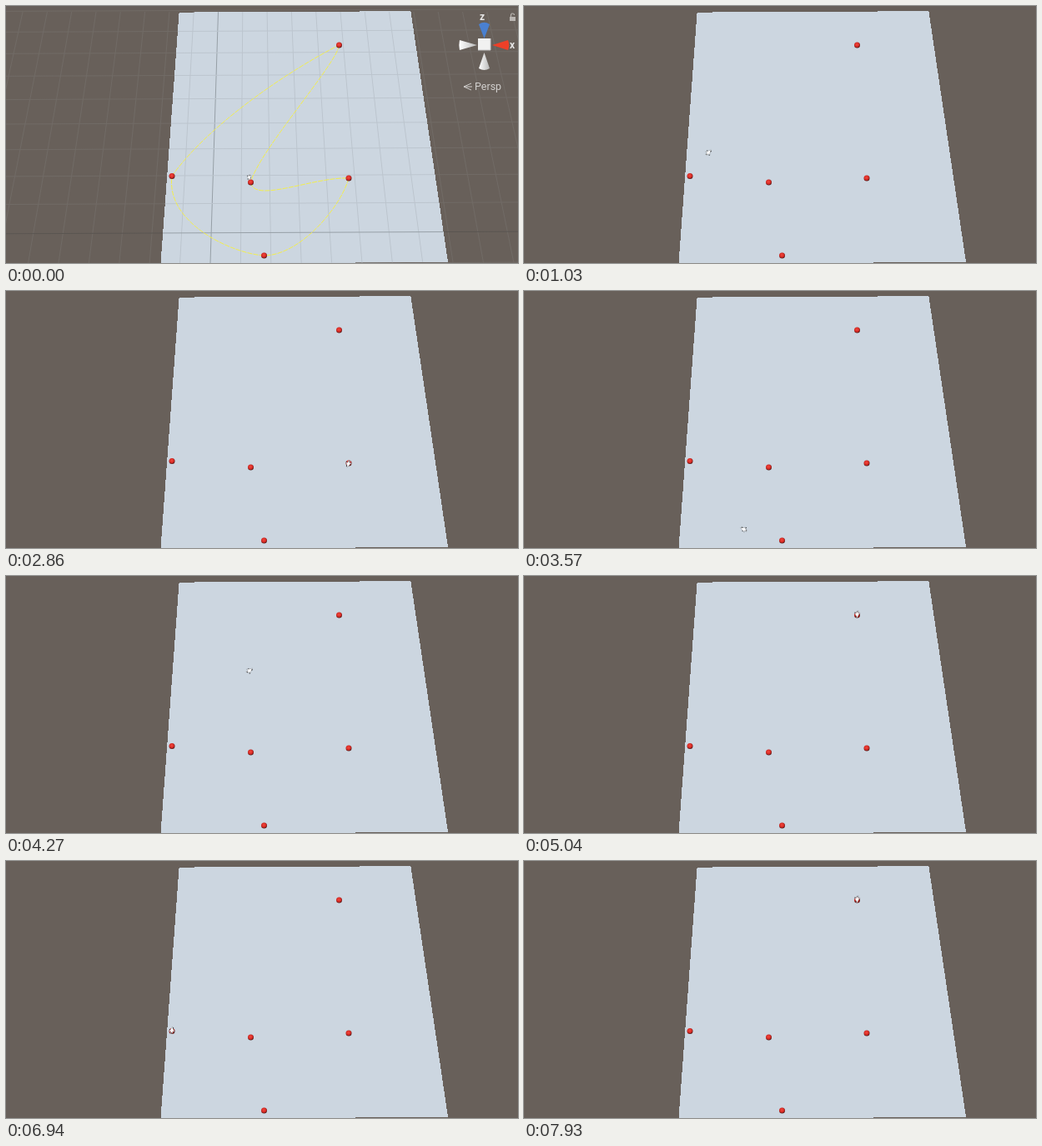
An HTML page for the animation above (8000 ms loop, 614 by 309 pixels).

```html
<!DOCTYPE html>
<html lang="en">
<head>
<meta charset="utf-8">
<title>Spline follower</title>
<style>
  html, body { margin: 0; width: 100%; height: 100%; overflow: hidden; background: #68605a; }
  svg { display: block; width: 614px; height: 309px; }
  text { font-family: Roboto, "Open Sans", sans-serif; }
</style>
</head>
<body>
<svg viewBox="0 0 614 309">
  <defs>
    <path id="floor" d="M207.6 7.6 485.4 6.2 530 307.6 185.4 310.4Z"/>
    <clipPath id="floorClip"><use href="#floor"/></clipPath>
    <radialGradient id="red" cx=".45" cy=".4" r=".62">
      <stop offset="0" stop-color="#f2483c"/>
      <stop offset=".6" stop-color="#d62a25"/>
      <stop offset="1" stop-color="#451311"/>
    </radialGradient>
    <linearGradient id="pale"><stop offset="0" stop-color="#fff"/><stop offset="1" stop-color="#b9b9b9"/></linearGradient>
  </defs>
  <rect width="614" height="309" fill="#68605a"/>
  <g class="editor" id="outerGrid" fill="none" stroke="#716b66"/>
  <use href="#floor" fill="#ccd6e0" shape-rendering="crispEdges"/>
  <g class="editor" id="floorGrid" fill="none" stroke="#bcc5ce" clip-path="url(#floorClip)"/>
  <path class="editor" id="route" fill="none" stroke="#f3ee4e" stroke-dasharray="6 1.2"/>
  <g id="balls"/>
  <g id="craft">
    <path d="M4.5 0 1 -1.6 -2 -3.4 -1.4 -1 -4.2 -1.4 -3.4 1 -1.2 1.1 -1.6 3.2 1.2 1.5Z" fill="#fff" stroke="#8a9096" stroke-width=".5"/>
    <path d="M2 1.2h1.6M-2.4 2.7h1.2M-3.8 -.2h1.2M0 -2.6h1" stroke="#333"/>
  </g>
  <g class="editor">
    <path d="M567 22Q573.5 17.5 580 22L573.5 39Z" fill="#4a80d0"/>
    <path d="M602 41Q604.5 47 602 53L583 47Z" fill="#ee4028"/>
    <path d="M544 41Q542.6 47 544 53L565 47Z" fill="url(#pale)"/>
    <path d="M573.5 56 567 75Q573.5 79 580 75Z" fill="url(#pale)"/>
    <path d="M566 39h15v14h-15z" fill="#f1f1f1"/>
    <path d="M566 53h15V39" fill="none" stroke="#c8c8c8"/>
    <g fill="#e6e6e6" font-size="12" font-weight="700">
      <text x="568" y="17">z</text><text x="604" y="50.5">x</text>
    </g>
    <text x="562" y="101" font-size="12.5" fill="#d2d0ce">Persp</text>
    <path d="M558 93 549 97H559M549 97 558 101" fill="none" stroke="#d2d0ce"/>
    <path d="M604 13h7v5h-7z" fill="#b9b5b1"/>
    <path d="M605.5 13v-2a2 2 0 0 1 4 0" fill="none" stroke="#b9b5b1" stroke-width="1.2"/>
  </g>
  <path id="cursor" d="M0 0V12L2.8 9.4 4.6 13.8 6.6 13 4.8 8.8H8.4Z" fill="#fff" stroke="#000"/>
</svg>
<script>
const $ = id => document.getElementById(id);
const add = (parent, tag, attrs) => {
  const el = document.createElementNS('http://www.w3.org/2000/svg', tag);
  for (const k in attrs) el.setAttribute(k, attrs[k]);
  parent.append(el);
};

// Each node with the two handles of the curve to the next node
const NODES = [
  [[199, 204.5], [242, 143], [340, 77]],
  [[399.5, 47], [398, 68], [302, 176]],
  [[293.5, 212], [297, 238], [370, 205]],
  [[411, 207], [402, 241], [353, 300]],
  [[309.5, 300], [272, 298], [191, 261]]
];
const LEGS = NODES.map((n, i) => [...n, NODES[(i + 1) % 5][0]]);

$('route').setAttribute('d', LEGS.map(([a, ...rest]) => `M${a}C${rest.join(' ')}`).join(''));
for (const [[cx, cy]] of NODES) add($('balls'), 'circle', { cx, cy, r: 3.5, fill: 'url(#red)' });

// Ground grid in perspective
function grid(parent, major) {
  const line = (d, strong) => add(parent, 'path', strong ? { d, stroke: major } : { d });
  for (let k = -11; k <= 15; k++)
    line(`M${254.5 + 29.3 * k} 7L${245 + 36.4 * k} 309`, k === 0);
  for (let k = -1; k <= 9; k++) {
    const y = 1 / (6.616e-4 + k * 1.58e-5) - 1239;
    line(`M0 ${y + 1.3}L614 ${y - 1.3}`, k === 0);
  }
}
grid($('outerGrid'), '#5a5551');
grid($('floorGrid'), '#969fa6');

// Times of arrival at successive nodes; the craft waits before a leg if there is time to spare
const FIRST = 3, LONGEST = 580;
const ARRIVALS = [400, 660, 920, 1515, 2520, 2840, 3400, 3960, 4610, 5850, 6240, 6600, 6950, 7560];

const clamp = v => Math.min(1, Math.max(0, v));
const ease = u => { const v = u ** .8; return v * v * (3 - 2 * v); };

function travelled(t) {
  let s = FIRST;
  for (let i = 1; i < ARRIVALS.length; i++) {
    const end = ARRIVALS[i], begin = Math.max(ARRIVALS[i - 1], end - LONGEST);
    s += ease(clamp((t - begin) / (end - begin)));
  }
  return s;
}

const mix = (a, b, u) => a.map((v, i) => v + (b[i] - v) * u);

// De Casteljau: the last pair gives both the place and the heading
function pose(s) {
  let pts = LEGS[Math.floor(s) % 5];
  const u = s % 1;
  while (pts.length > 2) pts = pts.slice(1).map((p, i) => mix(pts[i], p, u));
  const [a, b] = pts, [x, y] = mix(a, b, u);
  return `translate(${x} ${y - 1}) rotate(${Math.atan2(b[1] - a[1], b[0] - a[0]) * 180 / Math.PI})`;
}

// The pointer sweeps across once, then peeks in at the corner
function pointer(t) {
  if (t < 5400) {
    const u = (t - 4290) / 400;
    return [440 + 180 * u * u, -20 + 290 * Math.sin(clamp(u) * Math.PI / 2)];
  }
  const away = Math.abs(t - 5890) / 200;
  return [602 + 16 * away, 303 + 6 * away];
}

const editor = document.querySelectorAll('.editor');
const STEP = 70.4;

function draw(ms) {
  const editing = ms < 70;
  const t = 400 + Math.floor((ms - 400) / STEP + .12) * STEP;
  for (const el of editor) el.style.display = editing ? '' : 'none';
  $('craft').setAttribute('transform', editing
    ? 'translate(291.5 206) rotate(100) scale(.8)'
    : pose(travelled(t)));
  $('cursor').setAttribute('transform', `translate(${pointer(t)})`);
}

let start;
function tick(now) {
  start ??= now;
  draw((now - start) % 8000);
  requestAnimationFrame(tick);
}
requestAnimationFrame(tick);
</script>
</body>
</html>
```
